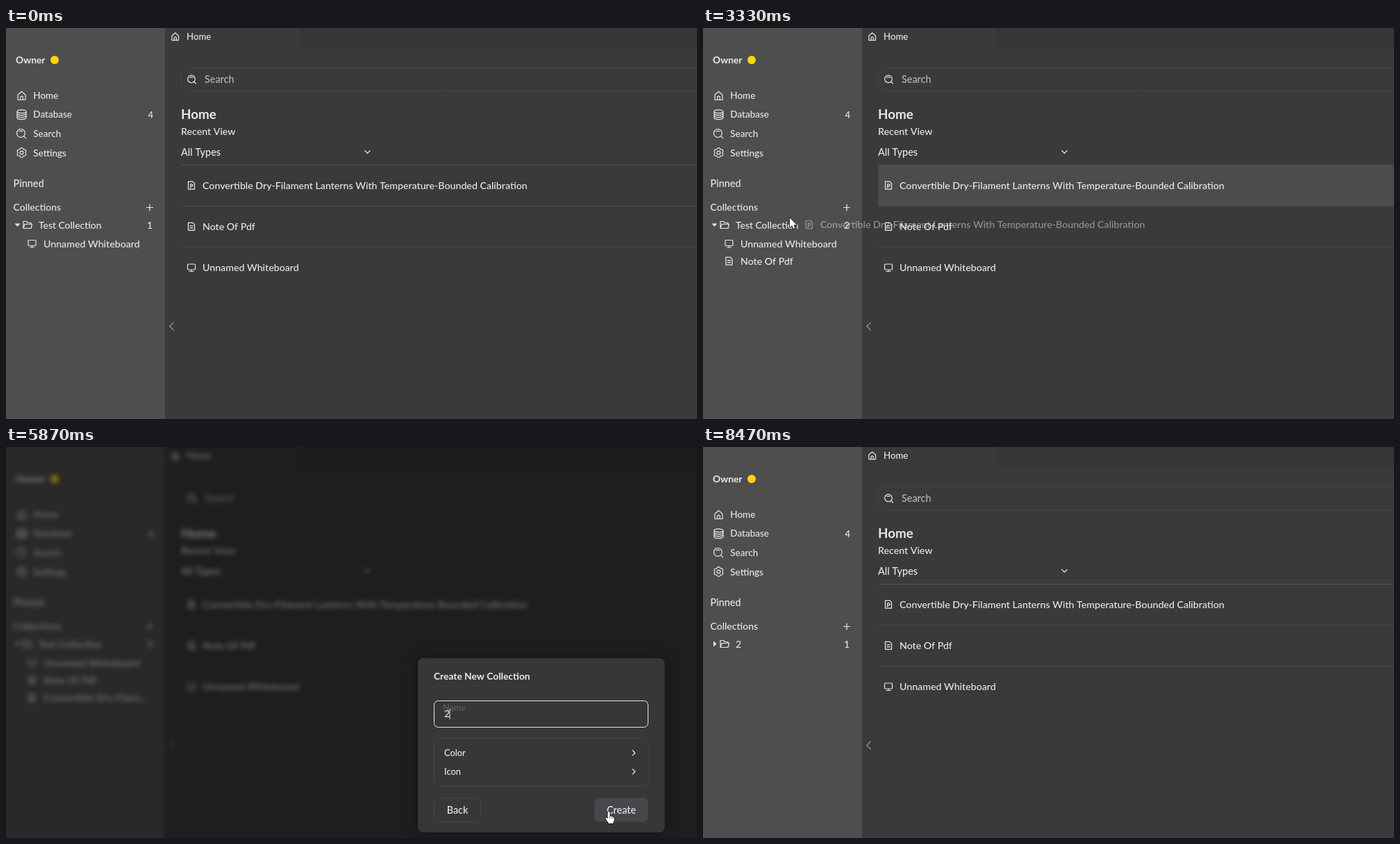
These frames come from a looping animation (995 px wide and 563 px high, 8870 ms). An HTML page with a canvas:

```html
<!DOCTYPE html>
<html lang="en">
<head>
<meta charset="utf-8">
<title>Collections</title>
<style>
html, body { margin: 0; width: 100%; height: 100%; overflow: hidden; background: #3b3939; }
canvas { display: block; }
</style>
</head>
<body>
<canvas id="stage" width="995" height="563"></canvas>
<script>
const W = 995, H = 563, LOOP = 8870, STEP = 1000 / 15;
const stage = document.getElementById('stage');
const c = stage.getContext('2d');
const copy = document.createElement('canvas');
copy.width = W;
copy.height = H;
const copyCtx = copy.getContext('2d');

const TITLE = 'Convertible Dry-Filament Lanterns With Temperature-Bounded Calibration';
const SHORT_TITLE = 'Convertible Dry-Filam...';
const INK = '#eae9e9';

const clamp = v => Math.max(0, Math.min(1, v));
const ramp = (t, a, b) => clamp((t - a) / (b - a));
const between = (t, a, b) => t >= a && t < b;
const smooth = u => u * u * (3 - 2 * u);
const out3 = u => 1 - (1 - u) ** 3;
const out4 = u => 1 - (1 - u) ** 4;
const mix = (a, b, u) => a + (b - a) * u;
const glow = (t, a, b) => ramp(t, a, a + 130) * (1 - ramp(t, b, b + 130));

// Icons are centred on the origin.
const ICONS = {
  home: 'M-5.5-1.2L0-6 5.5-1.2V6H-5.5ZM-1.8 6V1.5Q0-.2 1.8 1.5V6',
  data: 'M-6.5-4.5C-6.5-7.6 6.5-7.6 6.5-4.5S-6.5-1.4-6.5-4.5V4.5C-6.5 7.6 6.5 7.6 6.5 4.5V-4.5M-6.5-1.5C-6.5 1.6 6.5 1.6 6.5-1.5M-6.5 1.5C-6.5 4.6 6.5 4.6 6.5 1.5',
  search: 'M5.3-.6A5.9 5.9 0 1 1-6.5-.6A5.9 5.9 0 1 1 5.3-.6M3.6 3.6L6.8 6.8M-2.8-3Q-.6-4.6 1.6-3',
  folder: 'M-6 5V-5H-1.5L.5-3H5V-1M-6 5L-4-1H6.5L5 5Z',
  board: 'M-4.5-5H4.5Q5.5-5 5.5-4V2Q5.5 3 4.5 3H-4.5Q-5.5 3-5.5 2V-4Q-5.5-5-4.5-5ZM0 3V5.5M-3 5.5H3',
  note: 'M-4.5-5.5H2L4.5-3V5.5H-4.5ZM-2.2-1H2.2M-2.2 2H2.2',
  pdf: 'M-4.5-5.5H2L4.5-3V5.5H-4.5ZM-1.3 3.5V-1.8H.6Q2.1-1.6 2.1-.2T.6 1.3H-1.3',
  plus: 'M-4.5 0H4.5M0-4.5V4.5',
  down: 'M-3.7-2L0 1.8 3.7-2',
  right: 'M-1.8-3.7L1.8 0-1.8 3.7',
  left: 'M2.8-5.3L-2.8 0 2.8 5.3'
};
for (const k in ICONS) ICONS[k] = new Path2D(ICONS[k]);
const ARROW = new Path2D('M0 0V14L3.2 11 5.4 15.6 7.5 14.7 5.5 10.3H9.9Z');
const HAND = new Path2D('M-1.6 1.3Q0-1.2 1.6 1.3V7Q3 5.8 4.2 7.4Q5.6 6.6 6.6 8.2Q8.2 7.8 8.4 9.6V13Q8 15 7 16.5V18H-.5V17Q-3 14.5-4.8 10.8Q-5.2 8.8-3.4 9L-1.6 11Z');

function icon(name, x, y, { color = INK, width = 1.2, scale = 1 } = {}) {
  c.save();
  c.translate(x, y);
  c.scale(scale, scale);
  c.strokeStyle = color;
  c.lineWidth = width / scale;
  c.lineJoin = c.lineCap = 'round';
  c.stroke(ICONS[name]);
  c.restore();
}

function text(s, x, y, size = 14.4, { color = INK, weight = 500, align = 'left' } = {}) {
  c.font = `${weight} ${size}px Lato, "Open Sans", sans-serif`;
  c.textAlign = align;
  c.fillStyle = color;
  c.fillText(s, x, y + size * 0.355);
}

function box(x, y, w, h, r, fill, stroke, width = 1) {
  c.beginPath();
  c.roundRect(x, y, w, h, r);
  if (fill) { c.fillStyle = fill; c.fill(); }
  if (stroke) { c.strokeStyle = stroke; c.lineWidth = width; c.stroke(); }
}

function rect(x, y, w, h, fill) {
  c.fillStyle = fill;
  c.fillRect(x, y, w, h);
}

function gear(x, y) {
  c.beginPath();
  for (let i = 0; i <= 72; i++) {
    const a = i / 72 * Math.PI * 2, r = 6.3 + 0.7 * Math.cos(a * 6);
    c.lineTo(x + r * Math.sin(a), y + r * Math.cos(a));
  }
  c.moveTo(x + 2.4, y);
  c.arc(x, y, 2.4, 0, Math.PI * 2);
  c.strokeStyle = INK;
  c.lineWidth = 1.2;
  c.stroke();
}

// Pointer moves: start, end, x, y, easing.
const MOVES = [
  [90, 810, 248, 294, out3], [810, 930, 289, 288, smooth],
  [1040, 1800, 94, 291, out3],
  [2150, 2950, 322, 215, smooth], [2950, 3070, 322, 226, smooth],
  [3150, 3580, 101, 279, out4],
  [4000, 4330, 213, 261, smooth],
  [4860, 5480, 700, 386, smooth], [5570, 5840, 868, 525, smooth],
  [6280, 6950, 87, 325, smooth], [6950, 7000, 87, 316, smooth],
  [7120, 7400, 92, 285, smooth],
  [7800, 8480, 326, 575, smooth]
];

function pointer(t) {
  let x = 882, y = 575;
  for (const [a, b, nx, ny, ease] of MOVES) {
    if (t <= a) break;
    const u = ease(ramp(t, a, b));
    x = mix(x, nx, u);
    y = mix(y, ny, u);
  }
  return [x, y];
}

const HANDS = [[680, 1060], [2880, 3170], [4290, 4500], [5790, 6230], [6800, 7130]];
const DRAGS = [
  [1060, 2195, 'note', 'Note Of Pdf'],
  [3190, 3995, 'pdf', TITLE],
  [7190, 7795, 'folder', 'Test Collection']
];
// Drop target: outline start, tooltip start, end, label.
const DROPS = [
  [1460, 1600, 2195, 'Test Collection'],
  [3450, 3860, 3995, 'Test Collection'],
  [7460, 7460, 7795, '2']
];

function sidebar(t) {
  rect(0, 0, 229, H, '#4f4e4e');
  text('Owner', 14, 46.5, 13.8, { weight: 700 });
  c.beginPath();
  c.arc(70, 46, 6, 0, Math.PI * 2);
  c.fillStyle = '#ffd60a';
  c.fill();
  icon('home', 22.5, 97.5);
  icon('data', 22.5, 124.7);
  icon('search', 22, 152);
  gear(22.5, 179.5);
  ['Home', 'Database', 'Search', 'Settings'].forEach((s, i) => text(s, 39.3, 97 + i * 27.6, 13.5));
  text('4', 212, 125, 13, { align: 'right' });
  text('Pinned', 10.5, 223.5);
  text('Collections', 10.5, 258.3, 14);
  icon('plus', 207, 258.5);

  const drop = DROPS.find(d => between(t, d[0], d[2]));
  if (drop) box(9.5, 270, 207.5, 28, 5, '#535057', '#65759c', 2);
  tree(t);
  if (drop && t >= drop[1]) {
    const label = 'Move Into ' + drop[3];
    c.font = '500 12px Lato, "Open Sans", sans-serif';
    const w = c.measureText(label).width + 8;
    box(113 - w / 2, 239, w, 23, 4, '#0d0d0d');
    text(label, 113, 250.5, 12, { color: '#f4f4f4', align: 'center' });
  }
}

function collection(name, count, y, open) {
  c.beginPath();
  if (open) {
    c.moveTo(12.5, y - 2); c.lineTo(20.5, y - 2); c.lineTo(16.5, y + 2.5);
  } else {
    c.moveTo(15, y - 4); c.lineTo(19.5, y); c.lineTo(15, y + 4);
  }
  c.fillStyle = INK;
  c.fill();
  icon('folder', 31, y);
  text(name, 47, y + 0.3, 13.9);
  if (count) text(count, 211, y + 0.3, 14, { align: 'right' });
}

function tree(t) {
  const added = t >= 6270, nested = t >= 7795;
  let y = 283.5;
  if (added) {
    collection('2', nested ? 1 : 0, y, false);
    y += 29;
  }
  if (nested) return;
  const rows = [['board', 'Unnamed Whiteboard']];
  if (t >= 2195) rows.push(['note', 'Note Of Pdf']);
  if (t >= 3995) rows.push(['pdf', SHORT_TITLE]);
  if (added) {
    box(12, y - 13.5, 205, 27, 3, `rgba(255,255,255,${0.025 * glow(t, 6900, 7600)})`);
    box(23, y + 14.5, 194, 25, 3, `rgba(255,255,255,${0.07 * glow(t, 6780, 6950)})`);
  }
  collection('Test Collection', rows.length, y, true);
  rows.forEach(([kind, s], i) => {
    const ry = y + 27 + i * 25.2;
    icon(kind, 37.5, ry);
    text(s, 54, ry + 0.3, 14.2);
  });
}

function mainPane(t) {
  rect(229, 0, W - 229, H, '#3b3939');
  rect(423, 0, W - 423, 29, '#373535');
  icon('home', 243.7, 12.3, { scale: 0.88 });
  text('Home', 260, 12.3, 13.2);
  box(252.5, 57.5, 780, 33, 10, null, '#464444');
  icon('search', 267.5, 74, { scale: 0.9 });
  text('Search', 286, 74.3, 14.4, { color: '#b9b8b8' });
  text('Home', 252, 124.5, 18.8, { weight: 700 });
  text('Recent View', 252, 149.3, 14.2);
  text('All Types', 252, 178.7, 14.4);
  icon('down', 520.5, 178.5);

  const hover = [glow(t, 2880, 3940), glow(t, 760, 2200), glow(t, 600, 700)];
  hover.forEach((v, i) => rect(252, 197 + i * 59.3, W - 252, 59, `rgba(255,255,255,${0.09 * v})`));
  rect(252, 197, W - 252, 1, '#555353');
  rect(252, 256, W - 252, 1, '#494747');
  rect(252, 315, W - 252, 1, '#494747');
  const items = [['pdf', TITLE], ['note', 'Note Of Pdf'], ['board', 'Unnamed Whiteboard']];
  items.forEach(([kind, s], i) => {
    const y = 226.6 + i * 59.2;
    icon(kind, 267, y);
    text(s, 283, y + 0.2, 14.2);
  });
  icon('left', 238.5, 429.5, { color: '#8f8eae', width: 1.3 });
}

function ghost(t) {
  const drag = DRAGS.find(d => between(t, d[0], d[1]));
  if (!drag) return;
  const [x, y] = pointer(t - 35);
  c.save();
  c.globalAlpha = 0.5;
  icon(drag[2], x + 11, y + 14);
  text(drag[3], x + 27, y + 14.2, 14.2);
  c.restore();
}

function backdrop(p) {
  copyCtx.drawImage(stage, 0, 0);
  c.save();
  c.globalAlpha = p;
  c.filter = 'blur(3px)';
  c.drawImage(copy, 0, 0);
  c.restore();
  rect(0, 0, W, H, `rgba(0,0,0,${0.48 * p})`);
}

function dialog(t, p) {
  const line = '#444343', focus = t >= 5520;
  c.save();
  c.globalAlpha = p;
  c.translate(0, 60 * (1 - p));
  c.save();
  c.shadowColor = 'rgba(0,0,0,.35)';
  c.shadowBlur = 20;
  box(593, 304, 355.5, 251, 8, '#383737');
  c.restore();
  text('Create New Collection', 616, 330.5, 13.8, { weight: 700 });
  box(616.5, 365.5, 308, 38, 6, null, focus ? '#e6e6e6' : line);

  const k = ramp(t, 5770, 5970);
  c.save();
  c.globalAlpha = p * 0.65 * (1 - k) ** 1.6;
  text('Name', 631 - 4 * k, 385 - 20 * k, 13.5 - 2 * k);
  c.restore();
  const typed = t >= 5730;
  if (typed) text('2', 631, 384.5, 13.5);
  if (focus) rect(typed ? 638.5 : 631, 377, 1, 15, '#f0f0f0');

  box(616.5, 419.5, 308, 69, 6, null, line);
  text('Color', 631, 440.7, 12.8);
  text('Icon', 631, 467.8, 12.8);
  icon('right', 904, 440.5);
  icon('right', 904, 467.5);
  box(616.5, 505.5, 67, 34, 6, null, line);
  box(847.5, 505.5, 77, 34, 6, `rgba(90,89,97,${0.5 * glow(t, 5730, 6250)})`, line);
  text('Back', 650, 523, 14.4, { align: 'center' });
  text('Create', 886, 523, 14.4, { align: 'center' });
  c.restore();
}

function cursor(t) {
  if (t < 130 || t >= 8470) return;
  const [x, y] = pointer(t);
  const shape = HANDS.some(h => between(t, h[0], h[1])) ? HAND : ARROW;
  c.save();
  c.translate(x, y);
  if (shape === HAND) c.scale(0.92, 0.95);
  c.lineJoin = 'round';
  c.lineWidth = 1.8;
  c.strokeStyle = '#151515';
  c.stroke(shape);
  c.fillStyle = '#fff';
  c.fill(shape);
  if (shape === HAND) {
    c.lineWidth = 0.7;
    c.stroke(new Path2D('M1.6 7V10M4.2 7.4V10.5M6.6 8.4V10.5'));
  }
  c.restore();
}

function draw(t) {
  mainPane(t);
  sidebar(t);
  ghost(t);
  const shown = out3(ramp(t, 4670, 5020)) * (1 - out3(ramp(t, 6200, 6560)));
  if (shown > 0) {
    backdrop(shown ** 1.4);
    dialog(t, shown);
  }
  cursor(t);
}

const start = performance.now();
function frame() {
  const t = (performance.now() - start) % LOOP;
  draw(Math.floor((t + 5) / STEP) * STEP);
  requestAnimationFrame(frame);
}
frame();
</script>
</body>
</html>
```
